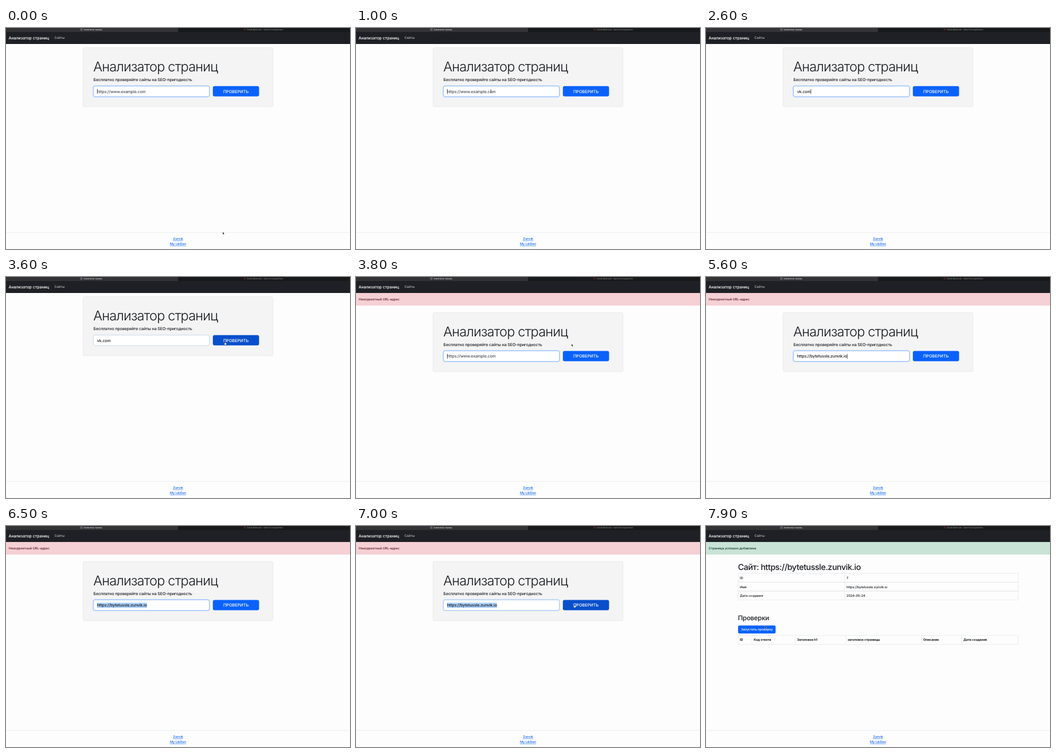
Animation, 600 px wide and 387 px high, one loop 8000 ms. Source, as an HTML page:

```html
<!DOCTYPE html>
<html lang="ru">
<head>
<meta charset="utf-8">
<title>Анализатор страниц</title>
<style>
  html, body { margin: 0; width: 100%; height: 100%; overflow: hidden; background: #fdfdfd; }
  svg { display: block; width: 600px; height: 387px; }
  text {
    font-family: Inter, Roboto, "Liberation Sans", sans-serif;
    font-weight: 450;
    text-rendering: geometricPrecision;
    letter-spacing: -.018em;
    fill: #181b1f;
  }
  .light { font-weight: 330; }
  .medium { font-weight: 540; }
  .bold { font-weight: 700; }
  .line { fill: none; stroke: #dee1e4; stroke-width: .6; }
  .link { fill: #0a62f5; text-decoration: underline; text-anchor: middle; }
</style>
</head>
<body>
<svg id="stage" viewBox="0 0 600 387" xmlns="http://www.w3.org/2000/svg"></svg>
<script>
const LOOP = 8000, STEP = 100;
const SHIFT = 27.7;               // the form moves down below an alert
const BLUE = [10, 98, 251], DARK = [9, 79, 204];
const SITE = 'https://bytetussle.zunvik.io';
const HINT = 'https://www.example.com';

const text = (x, y, size, str, attrs = '') =>
  `<text x="${x}" y="${y}" font-size="${size}" ${attrs}>${str}</text>`;
const rect = (x, y, w, h, fill, attrs = '') =>
  `<rect x="${x}" y="${y}" width="${w}" height="${h}" fill="${fill}" ${attrs}/>`;
const style = s => `style="${s}"`;

function chrome() {
  return rect(0, 0, 600, 7, '#18191a') + rect(0, 0, 300, 7, '#343437') +
    rect(0, 7, 600, 21, '#1e2025') +
    rect(129.5, .8, 4, 4, '#59626d') +
    text(135.5, 3.8, 3.25, 'Анализатор страниц', 'class="medium" ' + style('fill:#f4f4f4')) +
    rect(414.5, 1, 3.4, 3.4, '#4c2224') +
    text(420, 3.8, 3.2, 'Zunvik Bytetussle - Game for programmers', style('fill:#9c9c9e')) +
    text(4.5, 20.4, 7.1, 'Анализатор страниц', 'class="medium" ' + style('fill:#fff;letter-spacing:-.012em')) +
    text(84.4, 19.4, 5.85, 'Сайты', style('fill:#b0b2b4')) +
    `<path class="line" d="M0 358H600"/>` +
    text(300, 371, 5.7, 'Zunvik', 'class="link"') +
    text(300, 380, 5.7, 'My LibDen', 'class="link"');
}

function alertBar(id, fill, edge, ink, str) {
  return `<g id="${id}">` + rect(0, 28, 600, 21.7, fill) + rect(0, 49.3, 600, .5, edge) +
    text(4.8, 41, 5.7, str, style(`fill:${ink}`)) + '</g>';
}

function homePage() {
  return '<g id="home">' +
    rect(134.4, 34.4, 331.2, 103.6, '#f4f4f5', 'rx="3" stroke="#dfe1e4" stroke-width=".6"') +
    text(152.3, 76, 23.6, 'Анализатор страниц', 'class="light" ' + style('letter-spacing:-.035em')) +
    text(152.5, 93, 7.1, 'Бесплатно проверяйте сайты на SEO-пригодность') +
    rect(152, 101.2, 203.2, 19.4, 'none', 'id="ring" rx="3.6" stroke="#0d6efd" stroke-opacity=".27" stroke-width="1.6"') +
    rect(152.7, 101.9, 201.8, 18, '#fff', 'id="box" rx="3" stroke-width=".6"') +
    rect(158.8, 106.7, 0, 9, '#a9ccf8', 'id="mark"') +
    text(158.8, 113.7, 7.1, '', 'id="field"') +
    rect(159, 106.8, .7, 8.6, '#111', 'id="caret"') +
    rect(360.8, 101.7, 80.6, 18.1, '', 'id="submit" rx="3"') +
    text(401.1, 113.6, 7.3, 'ПРОВЕРИТЬ', 'text-anchor="middle" ' + style('fill:#fff;letter-spacing:-.005em')) +
    '</g>';
}

function sitePage() {
  const rows = [['ID', '7'], ['Имя', SITE], ['Дата создания', '2024-05-24']];
  const heads = [[56, 'ID'], [80.3, 'Код ответа'], [155.8, 'Заголовок h1'],
    [244, 'заголовок страницы'], [376, 'Описание'], [446, 'Дата создания']];
  let out = '<g id="site">' +
    text(55.8, 76.5, 14.3, 'Сайт: ' + SITE, 'class="medium" ' + style('letter-spacing:-.03em'));
  rows.forEach(([name, value], i) => {
    const y = 83 + i * 15.5;
    out += rect(56, y, 488.4, 15.5, 'none', 'class="line"') +
      text(59, y + 10, 5.7, name) + text(245, y + 10, 5.7, value);
  });
  out += '<path class="line" d="M242 83v46.5"/>' +
    text(55.8, 165, 11.4, 'Проверки', 'class="medium"') +
    rect(56, 174.2, 65.4, 14, `rgb(${BLUE})`, 'rx="2.2"') +
    text(88.7, 183.3, 5.7, 'Запустить проверку', 'text-anchor="middle" ' + style('fill:#fff')) +
    rect(56, 191.6, 488.4, 15.6, 'none', 'class="line"');
  heads.forEach(([x, name], i) => {
    if (i) out += `<path class="line" d="M${x} 191.6v15.6"/>`;
    out += text(x + 3, 201.4, 5.6, name, 'class="bold"');
  });
  return out + '</g>';
}

function pointers() {
  return `<g id="mouse">
    <path id="arrow" d="M0 0v4.4l1-.9.7 1.6.8-.4-.7-1.5h1.3z" fill="#111" stroke="#fff" stroke-width=".35"/>
    <path id="beam" d="M-1.2-2.7Q0-2.7 0-2Q0-2.7 1.2-2.7M0-2V2M-1.2 2.7Q0 2.7 0 2Q0 2.7 1.2 2.7" fill="none" stroke="#333" stroke-width=".6"/>
    <path id="hand" d="M-.4-1.8q.5-.6.9 0v1.3l1.6.5q.5.3.4 1l-.5 1.8h-2.5l-1.5-2q0-.7.8-.4l.8.5z" fill="#fff" stroke="#222" stroke-width=".35"/>
  </g>`;
}

document.getElementById('stage').innerHTML =
  rect(0, 0, 600, 387, '#fdfdfd') + chrome() +
  alertBar('error', '#f5d0d4', '#efbfc4', '#5e2029', 'Некорректный URL-адрес') +
  alertBar('success', '#c9e3d7', '#b4d6c5', '#123c28', 'Страница успешно добавлена') +
  homePage() + sitePage() + pointers();

const el = id => document.getElementById(id);
const show = (id, on) => el(id).setAttribute('visibility', on ? 'visible' : 'hidden');
const set = (id, attrs) => { for (const k in attrs) el(id).setAttribute(k, attrs[k]); };
const ramp = (t, from, to) => Math.min(1, Math.max(0, (t - from) / (to - from)));
const ease = p => p * p * (3 - 2 * p);
const mix = (a, b, p) => a.map((v, i) => Math.round(v + (b[i] - v) * p));

// time, x, y
const moves = [
  [0, 378, 357], [100, 377, 354], [900, 235.2, 110.6], [2900, 235.2, 110.6], [3400, 382, 116],
  [3700, 382, 116], [4400, 272, 134], [6500, 272, 134], [6800, 381, 140],
  [7300, 381, 140], [7900, 102.5, 174.5], [LOOP, 102.5, 174.5]
];
// field contents from each time on
const typed = [[0, ''], [1900, 'v'], [2000, 'vk'], [2200, 'vk.'], [2300, 'vk.c'],
  [2500, 'vk.co'], [2600, 'vk.com'], [3700, ''], [5300, SITE]];
// moments when the caret starts a new blink
const wakes = [0, 1100, 1900, 2000, 2200, 2300, 2500, 2600, 3700, 4500, 5300];

function mouseAt(t) {
  const i = moves.findIndex((m, n) => n && t <= m[0]);
  const [t0, x0, y0] = moves[i - 1], [t1, x1, y1] = moves[i];
  const p = ease(ramp(t, t0, t1));
  return [x0 + (x1 - x0) * p, y0 + (y1 - y0) * p];
}

function drawForm(t) {
  const value = typed.findLast(k => t >= k[0])[1];
  const field = el('field');
  const selected = t >= 6400;
  const blur = t < 3700 ? ramp(t, 3450, 3620) : ramp(t, 6950, 7120);
  const hover = t < 3700 ? ramp(t, 3250, 3400) : ramp(t, 6640, 6800);
  field.textContent = value || HINT;
  field.style.fill = value ? '#181b1f' : '#484d53';
  field.style.letterSpacing = '-.028em';
  const width = value ? field.getComputedTextLength() : 0;
  set('caret', { x: 158.9 + width });
  set('mark', { width: selected ? width : 0 });
  set('ring', { opacity: 1 - blur });
  set('box', { stroke: `rgb(${mix([134, 183, 254], [206, 212, 218], blur * .8)})` });
  set('submit', { fill: `rgb(${mix(BLUE, DARK, hover)})` });
  const since = t - wakes.findLast(w => t >= w);
  show('caret', !selected && blur === 0 && since % 1000 < 500);
}

function drawMouse(t, onHome, dy) {
  const [x, y] = mouseAt(t);
  const inRow = onHome && y > 102 + dy && y < 120 + dy;
  const kind = inRow && x > 153 && x < 355 ? 'beam' : inRow && x > 361 && x < 441 ? 'hand' : 'arrow';
  const hidden = (t >= 1900 && t < 3000) || (t >= 5300 && t < 6600);
  set('mouse', { transform: `translate(${x} ${y})` });
  for (const id of ['arrow', 'beam', 'hand']) show(id, !hidden && id === kind);
}

function render(t) {
  const onHome = t < 7200;
  const dy = t >= 3700 ? SHIFT : 0;
  el('home').style.display = onHome ? '' : 'none';
  el('site').style.display = onHome ? 'none' : '';
  set('home', { transform: `translate(0 ${dy})` });
  show('error', onHome && t >= 3700);
  show('success', !onHome);
  if (onHome) drawForm(t);
  drawMouse(t, onHome, dy);
}

let last = -1;
function tick() {
  const t = Math.floor(performance.now() % LOOP / STEP) * STEP;
  if (t !== last) render(last = t);
  requestAnimationFrame(tick);
}
tick();
</script>
</body>
</html>
```
